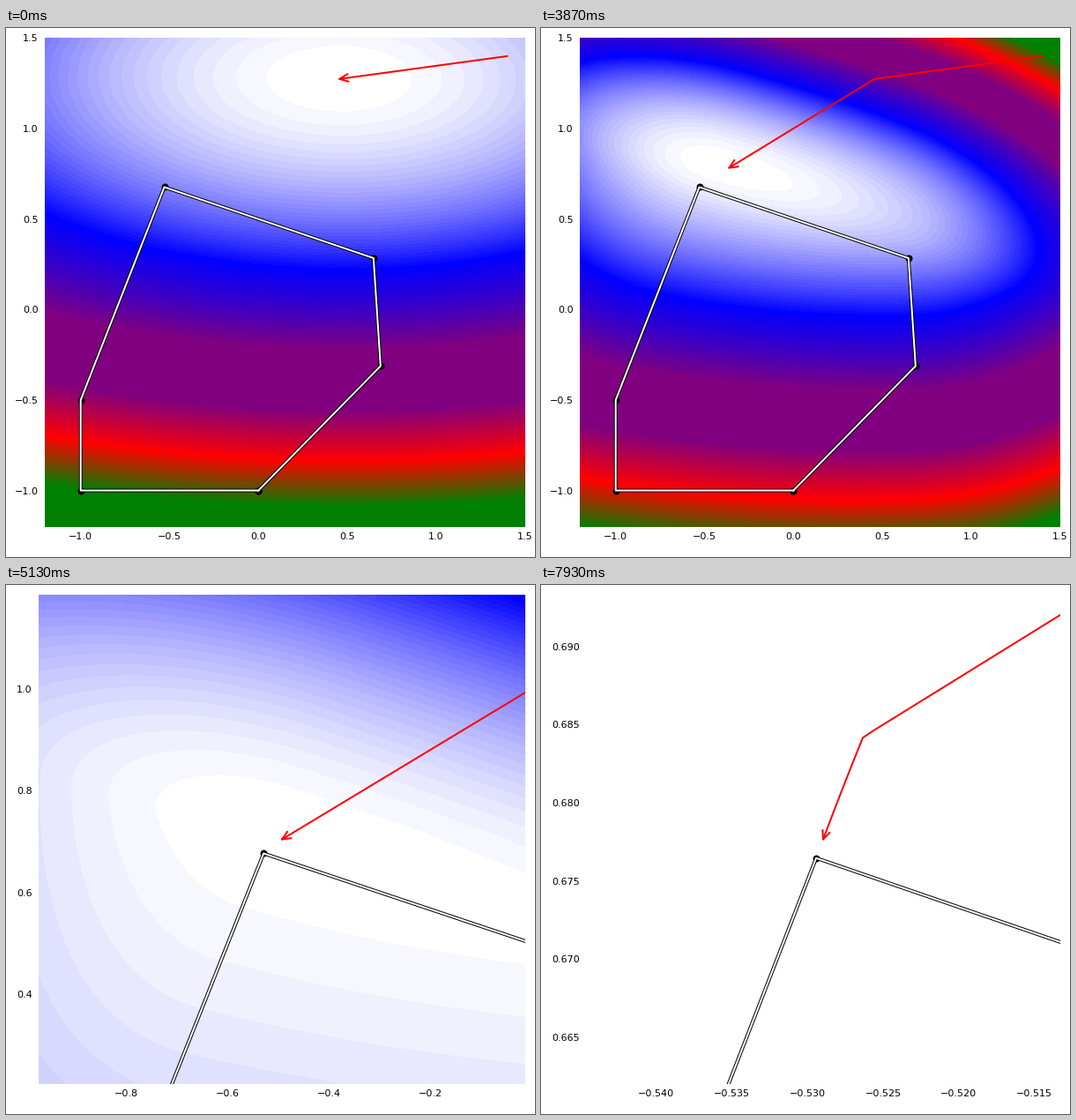
These frames come from a looping animation (600x600 px, 7990 ms). A matplotlib script:

```python
"""Quadratic penalty method: the minimiser drifts towards the feasible polygon."""
import numpy as np
import matplotlib.pyplot as plt
from matplotlib.animation import FuncAnimation

SIZE, DPI = 600, 100
PX = 72 / DPI                      # one pixel in points
FRAMES, LOOP = 120, 7990
TOP, BOTTOM, RIGHT = 11.4, 565.6, 588.6
LO, HI = -1.2, 1.5
LEVELS = 200

# Objective (x - c)' Q (x - c), constraints A x <= b
Q = np.array([1.0, 5.0])
C = np.array([0.5, 1.3])
A = np.array([[1, 3], [-1.25, 0.5], [1.5, 0.1], [0.5, -0.5], [-1, 0], [0, -1]])
B = np.array([1.5, 1, 1, 0.5, 1, 1])
CORNERS = [(0, -1), (11 / 16, -5 / 16), (28.5 / 44, 12.5 / 44),
           (-9 / 17, 23 / 34), (-1, -0.5), (-1, -1), (0, -1)]
START = (1.4, 1.4)
RHO = 2 ** np.linspace(-6, 8, FRAMES)

STOPS = np.array([(255, 255, 255), (0, 0, 255), (128, 0, 128), (128, 0, 128),
                  (255, 0, 0), (0, 128, 0), (0, 128, 0)])
PALETTE = np.stack([np.interp(np.linspace(0, 1, LEVELS), np.linspace(0, 1, 7), ch)
                    for ch in STOPS.T], axis=1).round().astype(np.uint8)


def value(x, y, rho):
    total = Q[0] * (x - C[0]) ** 2 + Q[1] * (y - C[1]) ** 2
    for (p, q), b in zip(A, B):
        total = total + rho * np.maximum(p * x + q * y - b, 0) ** 2
    return total


def minimiser(rho, x):
    for _ in range(20):
        on = A @ x > B
        act = A[on]
        x = np.linalg.solve(np.diag(Q) + rho * act.T @ act,
                            Q * C + rho * act.T @ B[on])
    return x


def trace():
    pts, x = [START], C
    for rho in RHO:
        x = minimiser(rho, x)
        pts.append(tuple(x))
    return np.array(pts)


def ticks(lo, hi):
    """Nicest tick positions and the number of decimals to print."""
    span = hi - lo
    base = int(np.floor(np.log10(span)))
    best, found = -1, None
    for z in (base - 1, base):
        for q, nice, extra in ((1, 1, 0), (5, 0.9, 0), (2, 0.7, 0), (2.5, 0.5, 1)):
            step = q * 10.0 ** z
            ks = np.arange(np.ceil(lo / step - 1e-6), np.floor(hi / step + 1e-6) + 1)
            n = len(ks)
            if not 4 <= n <= 8:
                continue
            score = (0.25 * (1 - abs(n - 5) / 5) + 0.25 * nice
                     + 0.25 * (n - 1) * step / span + (0 in ks) / 6)
            if score > best:
                best, found = score, (ks * step, max(1, extra - z))
    return found


def tick_labels(lo, hi):
    at, places = ticks(lo, hi)
    return [(v, f"{v + 0.0:.{places}f}".replace("-", "\u2212")) for v in at]


def window(centre, half):
    return [(max(LO, c - half), min(HI, c + half)) for c in centre]


PATH = trace()

plt.rcParams["font.family"] = "DejaVu Sans"
fig = plt.figure(figsize=(SIZE / DPI, SIZE / DPI), dpi=DPI, facecolor="white")
ax = fig.add_axes([0, 0, 1, 1])
ax.axis("off")
field = ax.imshow(np.full((2, 2, 3), 255, np.uint8), aspect="auto",
                  interpolation="nearest", zorder=0)
px, py = np.array(CORNERS).T
ax.plot(px, py, color="black", lw=4 * PX, zorder=2)
ax.plot(px, py, "o", color="black", ms=8 * PX, mew=0, zorder=2.1)
ax.plot(px, py, color="white", lw=2 * PX, zorder=2.2)
trail, = ax.plot([], [], color="red", lw=2 * PX, zorder=3)
head, = ax.plot([], [], color="red", lw=2 * PX, zorder=3, solid_joinstyle="miter")
labels = []


def put_label(x, y, text, ha):
    labels.append(fig.text(x / SIZE, 1 - (y + 4) / SIZE, text, fontsize=8,
                           ha=ha, va="baseline", color="black"))


def draw(i):
    rho, tip = RHO[i], PATH[i + 1]
    (x0, x1), (y0, y1) = window(tip, 4 / rho)
    xlab, ylab = tick_labels(x0, x1), tick_labels(y0, y1)
    left = 37.4 + 7 * (max(len(s) for _, s in ylab) - 3)
    width, height = RIGHT - left, BOTTOM - TOP
    ax.set_position([left / SIZE, 1 - BOTTOM / SIZE, width / SIZE, height / SIZE])

    # Filled contours, scaled to the range over the full square
    nx, ny = round(width), round(height)
    xs = x0 + (np.arange(nx) + 0.5) / nx * (x1 - x0)
    ys = y1 - (np.arange(ny) + 0.5) / ny * (y1 - y0)
    low = value(*tip, rho)
    high = max(value(x, y, rho) for x in (LO, HI) for y in (LO, HI))
    z = (value(xs[None, :], ys[:, None], rho) - low) / (high - low)
    field.set_data(PALETTE[np.clip(z * LEVELS, 0, LEVELS - 1).astype(int)])
    field.set_extent((x0, x1, y0, y1))
    ax.set_xlim(x0, x1)
    ax.set_ylim(y0, y1)

    # Trail with an open arrow head of constant pixel size
    trail.set_data(*PATH[:i + 2].T)
    scale = np.array([width / (x1 - x0), height / (y1 - y0)])
    back = (PATH[i] - tip) * scale
    back /= np.hypot(*back)
    side = np.array([-back[1], back[0]])
    arms = [tip + (9.5 * back + s * side) / scale for s in (4.2, -4.2)]
    head.set_data(*np.array([arms[0], tip, arms[1]]).T)

    while labels:
        labels.pop().remove()
    for v, s in xlab:
        put_label(left + (v - x0) * scale[0], 576, s, "center")
    for v, s in ylab:
        put_label(left - 7.8, BOTTOM - (v - y0) * scale[1], s, "right")
    return []


anim = FuncAnimation(fig, draw, frames=FRAMES, interval=LOOP / FRAMES,
                     repeat=True, repeat_delay=0, blit=False)
plt.show()
```
